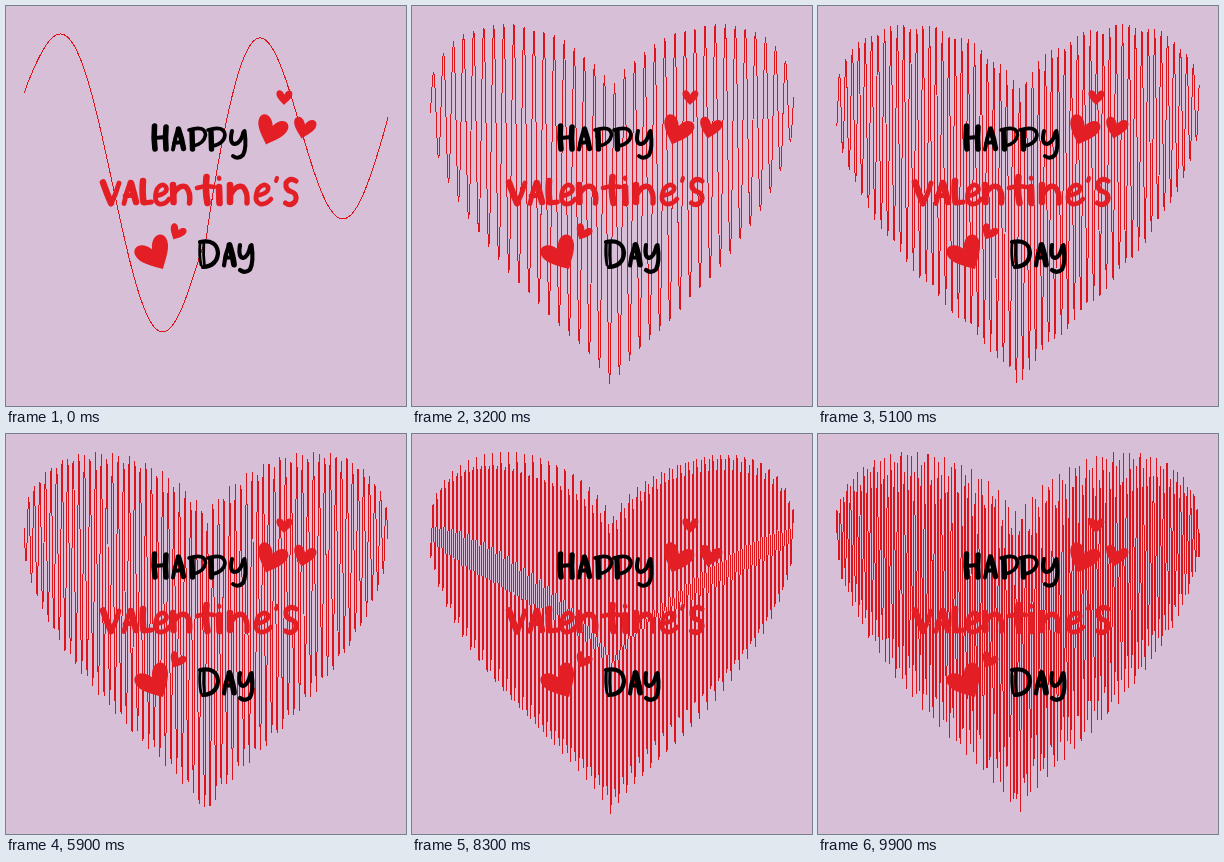
An HTML page that plays this animation: 400x400 px, repeating every 10000 ms.

```html
<!DOCTYPE html>
<html lang="en">
<head>
<meta charset="utf-8">
<title>Happy Valentine's Day</title>
<style>
  html, body { margin: 0; width: 100%; height: 100%; overflow: hidden; background: #d8bfd8; }
  svg { display: block; width: 100%; height: 100%; }
  #lettering path { fill: none; stroke-linecap: round; stroke-linejoin: round; }
</style>
</head>
<body>
<svg viewBox="0 0 400 400" role="img" aria-label="Happy Valentine's Day">
  <path id="curve" fill="none" stroke="#de141a" stroke-linejoin="bevel" shape-rendering="crispEdges"/>
  <g id="lettering">
    <!-- Happy -->
    <g stroke="#000">
      <path stroke-width="5.600" d="M148.500 120Q147.500 132 149 143M160 121Q159 132 160 143"/>
      <path stroke-width="4" d="M149 132L159 131M167 143.500Q169 132 172 123M168 137L176 136"/>
      <path stroke-width="5.400" d="M172.500 123Q176 133 177.500 142.500M186 125L186.500 143M205 125L205.500 143"/>
      <path stroke-width="3.600" d="M183 124Q199 119 199.500 129Q198 138 187 140M202 124Q218 119 219 129Q218 138 206 140"/>
      <path stroke-width="4" d="M226 125Q223 138 229 138Q235 137 237.500 126M238.500 125Q241 142 237 149Q232 154 227 150"/>
    </g>
    <!-- Valentine's -->
    <g stroke="#e31e24">
      <path stroke-width="6.600" d="M97 176.500Q101 188 105 197M125 177Q128 188 130 196M137 175Q136 187 137.500 196M167 179L167.500 196M200.500 171Q199 185 201.500 197M213 181L213.500 197M224 179L224 196"/>
      <path stroke-width="4.800" d="M105 198Q110 188 113 177M118 197.500Q120 187 124 177M119 190L128 189M138 197L145.500 196"/>
      <path stroke-width="4.600" d="M150 190Q163 187 160 181Q156 176 151 183Q147 195 153 198Q159 199 163 193"/>
      <path stroke-width="5.400" d="M168 187Q174 178 180 181Q185 186 183.500 197M225 188Q231 178 237 181Q242 186 241 197"/>
      <path stroke-width="4.600" d="M191 182Q200 179 208 181M213 172L213.200 172.500"/>
      <path stroke-width="4.600" d="M250 190Q264 187 262 181Q258 176 252 183Q247 195 254 198Q260 199 265 193"/>
      <path stroke-width="4" d="M271 172L270 175"/>
      <path stroke-width="5" d="M290 175Q284 171 280 177Q279 184 285 185.500Q292 188 289.500 195Q285 201 279.500 197"/>
    </g>
    <!-- Day -->
    <g stroke="#000">
      <path stroke-width="2.800" d="M194 237Q193 249 195 259M197.800 238Q197 249 198.500 260"/>
      <path stroke-width="5.800" d="M223.500 239Q227 250 228 258.500"/>
      <path stroke-width="4.200" d="M194 236Q211 233 212 247Q211 260 197 261M218 259.500Q219 249 223 239M219 252L227 251"/>
      <path stroke-width="4.200" d="M234 239Q232 251 237 252Q242 251 244.500 240M245.500 239Q248 256 244 263.500Q239 268 234 264"/>
    </g>
  </g>
  <g id="hearts" fill="#e31e24"></g>
</svg>
<script>
  const POINTS = 500, EDGE = 1.8, FRAMES = 100, STEP = 100;
  const curve = document.getElementById('curve');

  // Each heart: tip x, tip y, rotation, size
  const heart = 'M0 0C-.2-.22-.57-.5-.55-.8C-.53-1.08-.16-1.1 0-.7C.16-1.1.53-1.08.55-.8C.57-.5.2-.22 0 0Z';
  document.getElementById('hearts').innerHTML = [
    [260, 138.5, 20, 28], [278, 99, 2, 14.5], [295.5, 132.5, 14, 20.5], [157, 263, -29, 32], [167.500, 233.500, 27, 15]
  ].map(([x, y, turn, size]) =>
    `<path d="${heart}" transform="translate(${x} ${y}) rotate(${turn}) scale(${size})"/>`).join('');

  function heartCurve(a) {
    let d = '';
    for (let i = 0; i < POINTS; i++) {
      const x = EDGE * (2 * i / (POINTS - 1) - 1);
      const y = Math.cbrt(x * x) + 0.9 * Math.sqrt(3.3 - x * x) * Math.sin(a * Math.PI * x);
      d += (i ? 'L' : 'M') + (200 + 101 * x).toFixed(2) + ' ' + (235.6 - 92.1 * y).toFixed(2);
    }
    return d;
  }

  let shown = -1;
  function draw() {
    const n = Math.floor(performance.now() / STEP) % FRAMES;
    if (n !== shown) {
      shown = n;
      curve.setAttribute('d', heartCurve(1 + 59 * n / (FRAMES - 1)));
    }
    requestAnimationFrame(draw);
  }
  draw();
</script>
</body>
</html>
```
